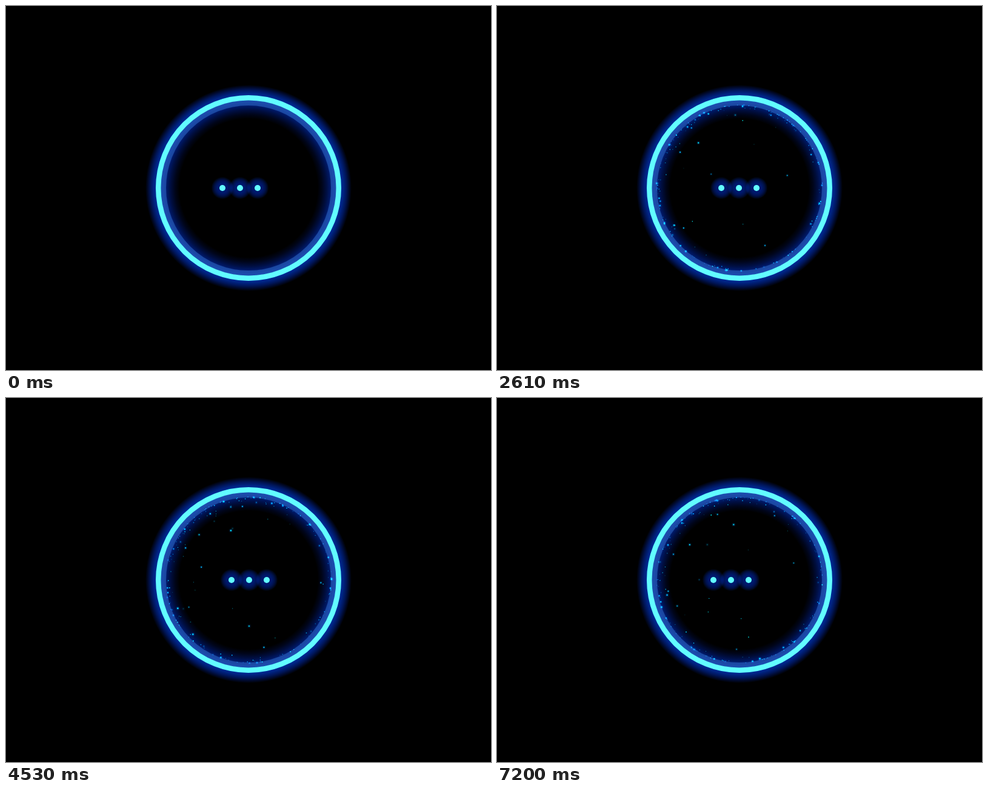
An HTML page with a canvas that plays this animation: 800x600 px, repeating every 7230 ms.

```html
<!DOCTYPE html>
<html lang="en">
<head>
<meta charset="utf-8">
<title>Glowing ring loader</title>
<style>
  html, body { margin: 0; width: 100%; height: 100%; overflow: hidden; background: #000; }
  canvas { display: block; width: 800px; height: 600px; }
</style>
</head>
<body>
<canvas id="stage" width="800" height="600"></canvas>
<script>
const ctx = document.getElementById('stage').getContext('2d');
const LOOP = 7230, STEP = 30;
const CX = 400, CY = 300, TAU = Math.PI * 2;
const CYCLE = 1800, SWING = 600, GAP = 29;
const CORE = '#62fcff';

let seed = 4127;
function rand() {
  seed = (seed * 1664525 + 1013904223) >>> 0;
  return seed / 4294967296;
}

// Sparks wander over a sphere seen from the front, so most sit near its rim.
const clusters = Array.from({ length: 5 }, () => rand() * TAU);
const sparks = Array.from({ length: 190 }, (_, i) => {
  const inner = rand() < 0.1;
  const grouped = i % 5 < 2;
  const angle = grouped ? clusters[i % 4] + (rand() - 0.5) * 0.5 : rand() * TAU;
  return {
    angle,
    spin: (rand() - 0.5) * 0.0005,
    depth: inner ? 0.6 + rand() * 0.39 : 0.1 + rand() * (grouped ? 0.5 : 0.3),
    rate: 0.0006 + rand() * 0.0009,
    phase: rand() * TAU,
    size: inner ? 0.6 + rand() * 0.7 : 0.5 + rand() * rand() * 0.8,
    birth: 60 + rand() * 1100,
    hue: 178 + rand() * 18
  };
});

function circle(x, y, r) {
  ctx.beginPath();
  ctx.arc(x, y, r, 0, TAU);
  ctx.fill();
}

function band(inner, outer, style) {
  ctx.strokeStyle = style;
  ctx.lineWidth = outer - inner;
  ctx.beginPath();
  ctx.arc(CX, CY, (inner + outer) / 2, 0, TAU);
  ctx.stroke();
}

function fade(from, to, stops) {
  const g = ctx.createRadialGradient(CX, CY, from, CX, CY, to);
  stops.forEach((c, i) => g.addColorStop(i / (stops.length - 1), c));
  return g;
}

const innerGlow = fade(114, 136, ['#000', '#00051a', '#000e40', '#001a6c']);
const outerGlow = fade(153, 170, ['#002a94', '#00217c', '#00165a', '#000a2e', '#000']);
const rimGlow = fade(136, 145, ['#1a469f', '#1c4eb2']);

function drawRing() {
  band(114, 136.5, innerGlow);
  band(152, 170, outerGlow);
  band(136, 145, rimGlow);
  band(144.5, 153, CORE);
}

function drawSparks(t) {
  ctx.globalCompositeOperation = 'lighter';
  for (const s of sparks) {
    const grow = Math.min(1, Math.max(0, (t - s.birth) / 300));
    if (!grow) continue;
    const z = s.depth * Math.sin(s.phase + s.rate * t);
    const r = 137 * Math.sqrt(1 - z * z);
    const a = s.angle + s.spin * t;
    const x = CX + r * Math.cos(a), y = CY + r * Math.sin(a);
    const light = grow * (0.6 + 0.4 * Math.sin(s.phase * 3 + t * 0.004));
    if (s.size > 0.9) {
      ctx.fillStyle = `rgba(0,70,130,${0.35 * light})`;
      circle(x, y, s.size * 2.4);
    }
    ctx.fillStyle = `hsla(${s.hue},100%,48%,${light})`;
    circle(x, y, s.size);
  }
  ctx.globalCompositeOperation = 'source-over';
}

// A bead is an arc around (cx, CY); zero length gives a round dot.
function strokeBead(b, width, style) {
  ctx.lineWidth = width;
  ctx.strokeStyle = style;
  ctx.beginPath();
  if (b.span < 0.01) {
    const x = b.cx + b.r * Math.cos(b.a), y = CY + b.r * Math.sin(b.a);
    ctx.moveTo(x, y);
    ctx.lineTo(x + 0.01, y);
  } else {
    ctx.arc(b.cx, CY, b.r, b.a - b.span / 2, b.a + b.span / 2);
  }
  ctx.stroke();
}

function beadsAt(t) {
  const phase = t % CYCLE;
  const left = 357 + GAP * phase / CYCLE;
  const p = Math.max(0, (phase - CYCLE + SWING) / SWING);
  const turn = (1 - Math.cos(Math.PI * p)) / 2;
  const speed = Math.PI * Math.PI / 2 * Math.sin(Math.PI * p) / SWING;
  const still = x => ({ cx: x, r: 0, a: 0, span: 0 });
  return [
    still(left),
    still(left + GAP),
    { cx: left + GAP / 2, r: GAP * 1.5, a: Math.PI * turn, span: speed * 55 }
  ];
}

function drawBeads(t) {
  const beads = beadsAt(t), layers = 12;
  ctx.lineCap = 'round';
  ctx.globalCompositeOperation = 'lighter';
  for (const b of beads) {
    for (let k = 1; k <= layers; k++) {
      strokeBead(b, 10 + 26 * Math.sqrt(k / layers), 'rgba(0,40,160,0.06)');
    }
  }
  ctx.globalCompositeOperation = 'source-over';
  for (const b of beads) strokeBead(b, 10, CORE);
  ctx.lineCap = 'butt';
}

function render(t) {
  ctx.fillStyle = '#000';
  ctx.fillRect(0, 0, 800, 600);
  drawRing();
  drawSparks(t);
  drawBeads(t);
}

const start = performance.now();
function frame() {
  const t = (performance.now() - start) % LOOP;
  render(Math.floor(t / STEP) * STEP);
  requestAnimationFrame(frame);
}
frame();
</script>
</body>
</html>
```
